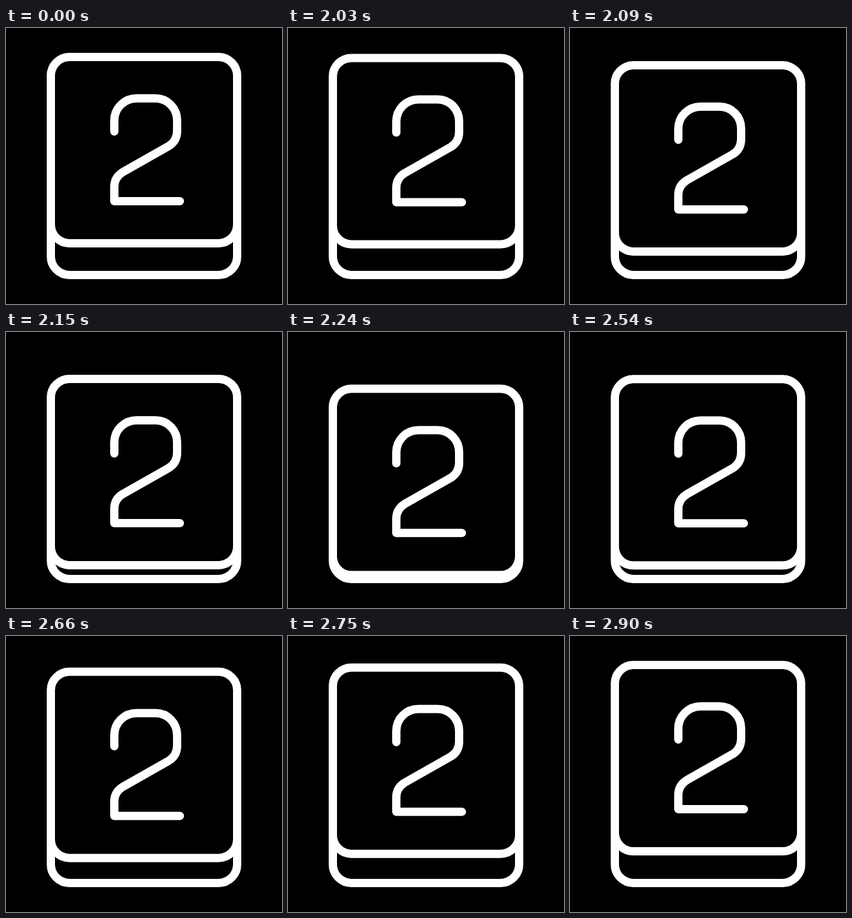
Write an HTML page that moves like this. It is 400x400 px and loops after 2930 ms.

```html
<!DOCTYPE html>
<html lang="en">
<head>
<meta charset="utf-8">
<title>Key press</title>
<style>
  html, body { margin: 0; width: 100%; height: 100%; overflow: hidden; background: #000; }
  svg { display: block; width: 100vw; height: 100vh; }
  path, rect { fill: none; stroke: #fff; stroke-width: 12; stroke-linejoin: round; }
  .digit { stroke-linecap: round; }
</style>
</head>
<body>
<svg viewBox="0 0 400 400">
  <path id="base"/>
  <g id="cap">
    <rect x="65" y="42" width="270" height="270" rx="27"/>
    <path class="digit" d="M157 150V134A32 32 0 0 1 189 102H217A31 32 0 0 1 248 134V149C248 159 244 166 236 171L169 209C161 214 157 220 157 230V251H252"/>
  </g>
</svg>
<script>
  const LOOP = 2930, STEP = 30, TRAVEL = 46;
  const PRESS = 2000, RELEASE = 2360;
  const base = document.getElementById('base');
  const cap = document.getElementById('cap');

  // Cubic easing with flat ends; x1 and x2 are the handle lengths in time.
  function ease(x, x1, x2) {
    if (x <= 0) return 0;
    if (x >= 1) return 1;
    let lo = 0, hi = 1;
    for (let i = 0; i < 24; i++) {
      const s = (lo + hi) / 2, r = 1 - s;
      if (3 * s * r * r * x1 + 3 * s * s * r * x2 + s * s * s < x) lo = s;
      else hi = s;
    }
    return lo * lo * (3 - 2 * lo);
  }

  function depth(t) {
    if (t < PRESS + STEP) return 0;
    const q = PRESS + Math.floor((t - PRESS) / STEP) * STEP;
    if (q <= RELEASE) return TRAVEL * ease((q - PRESS) / (RELEASE - PRESS), 0.28, 0.4);
    return TRAVEL * (1 - ease((q - RELEASE) / (LOOP - RELEASE), 0.33, 0.265));
  }

  const start = performance.now();

  function draw(now) {
    const y = depth(Math.max(0, now - start) % LOOP);
    const top = 285 + y;
    cap.setAttribute('transform', `translate(0 ${y})`);
    base.setAttribute('d', `M65 ${top}V331A27 27 0 0 0 92 358H308A27 27 0 0 0 335 331V${top}`);
    requestAnimationFrame(draw);
  }
  draw(start);
</script>
</body>
</html>
```
